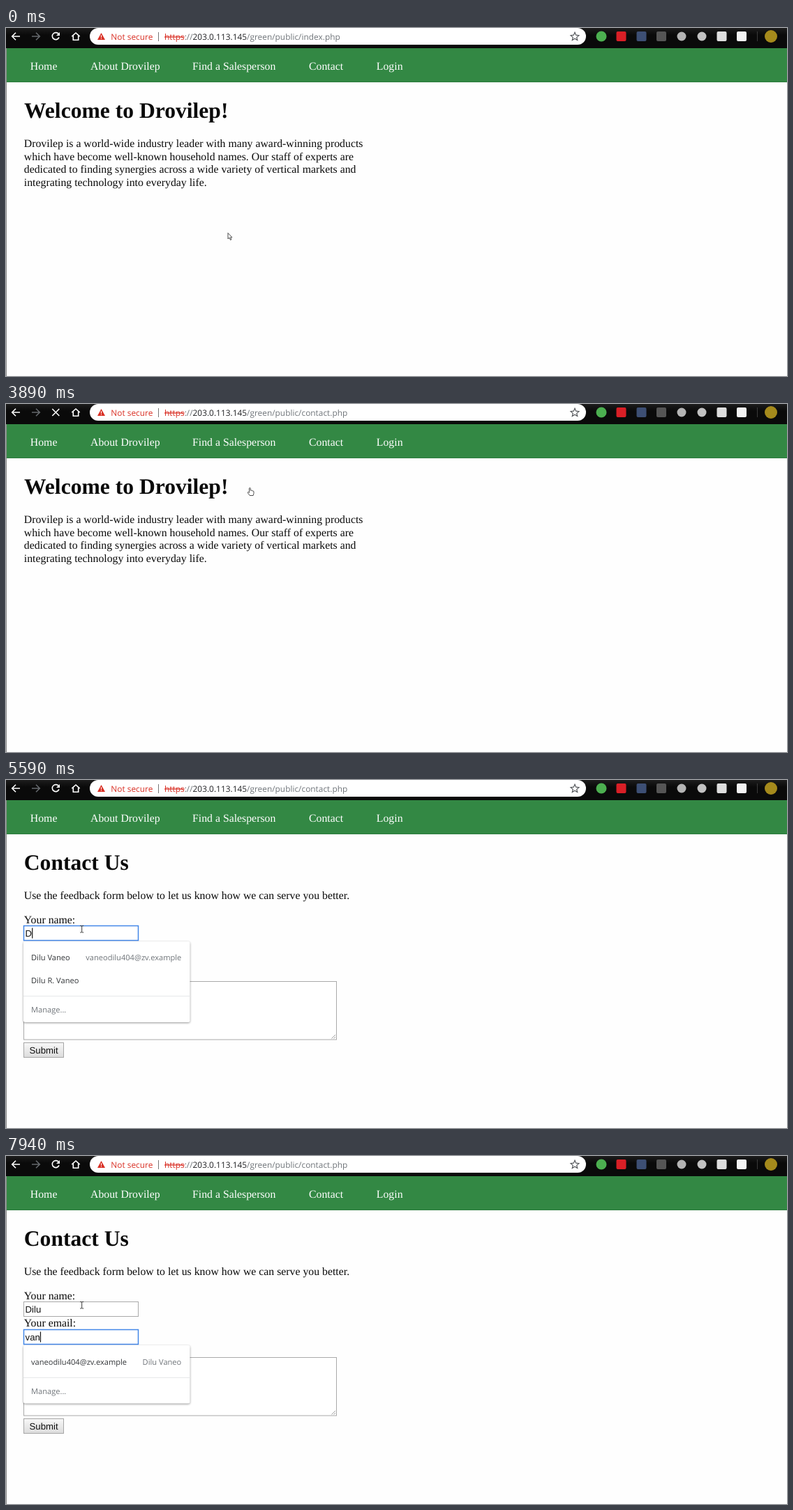
Write an HTML page that moves like this. It is 1119 px wide and 500 px high and loops after 8 s.

```html
<!DOCTYPE html>
<html lang="en">
<head>
<meta charset="utf-8">
<title>Feedback form</title>
<style>
  html, body { margin: 0; width: 100%; height: 100%; overflow: hidden; background: #fefefe; }
  svg { display: block; width: 1119px; height: 500px; }
  text { text-rendering: geometricPrecision; white-space: pre; }
  .serif { font: 15.8px "Liberation Serif", "Times New Roman", serif; fill: #0a0a0a; }
  .nav { fill: #fff; }
  .head { font-size: 31.6px; font-weight: bold; }
  .ui { font: 11.9px "Open Sans", "Noto Sans", sans-serif; fill: #70757a; }
  .item { font-size: 11.1px; fill: #333639; }
  .dim { fill: #70757a; }
  .field { font: 13.2px "Liberation Sans", Arial, sans-serif; fill: #111; }
  .box { fill: #fff; stroke: #a9a9a9; }
  .icon { fill: none; stroke: #fff; stroke-width: 1.6; }
  .menu rect { fill: #fff; filter: drop-shadow(0 1px 1.5px rgba(0, 0, 0, .42)); }
  .menu line { stroke: #e6e8ea; }
</style>
</head>
<body>
<svg id="stage" viewBox="0 0 1119 500"></svg>
<script>
const LOOP = 8000;
const BRAND = 'Drovilep', FIRST = 'Dilu', LAST = 'Vaneo';
const FULL = `${FIRST} ${LAST}`, MAIL = 'vaneodilu404@zv.example';

const text = (x, y, cls, body, extra = '') =>
  `<text x="${x}" y="${y}" class="${cls}" ${extra}>${body}</text>`;
const rect = (x, y, w, h, extra = '') =>
  `<rect x="${x}" y="${y}" width="${w}" height="${h}" ${extra}/>`;
const path = (d, extra = '') => `<path d="${d}" ${extra}/>`;
const dot = (x, r, fill) => `<circle cx="${x}" cy="12" r="${r}" fill="${fill}"/>`;
const tile = (x, fill) => rect(x - 7, 5, 14, 14, `rx="2" fill="${fill}"`);
const group = (id, body, extra = '') => `<g id="${id}" ${extra}>${body}</g>`;

const toolbar = `
  <linearGradient id="dark" x2="0" y2="1">
    <stop stop-color="#1d1d1d"/><stop offset=".35" stop-color="#0a0a0a"/><stop offset="1" stop-color="#0a0a0a"/>
  </linearGradient>
  ${rect(0, 0, 1119, 29, 'fill="url(#dark)"')}
  ${path('M20 12H9M14 6.7L8.7 12L14 17.3', 'class="icon"')}
  ${path('M37 12H48M43 6.7L48.3 12L43 17.3', 'class="icon" style="stroke:#66696d"')}
  ${group('reload', path('M75.6 9A5 5 0 1 0 76 13.4', 'class="icon"') + path('M77 6V11H72Z', 'fill="#fff"'))}
  ${path('M66.3 7L76.3 17M76.3 7L66.3 17', 'id="stop" class="icon"')}
  ${path('M94.3 12.2L100 7L105.7 12.2M96.3 11V17.3H103.7V11', 'class="icon"')}
  ${rect(120, 0, 711, 24, 'rx="12" fill="#fff"')}
  ${path('M136.5 7L142 17H131Z', 'fill="#d93025"')}
  ${path('M136.5 10.3V13.4M136.5 14.5V15.8', 'stroke="#fff" stroke-width="1.1"')}
  ${text(150.3, 17, 'ui', 'Not secure', 'style="fill:#d93025"')}
  ${path('M218.5 6V19', 'stroke="#777"')}
  ${text(227, 17, 'ui', '<tspan fill="#d93025" text-decoration="line-through">https</tspan>://' +
    '<tspan fill="#202124">203.0.113.145</tspan>/green/public/<tspan id="file"></tspan>.php')}
  ${path('M815 6.3L816.7 10.2L820.9 10.6L817.7 13.4L818.7 17.5L815 15.3L811.3 17.5L812.3 13.4L809.1 10.6L813.3 10.2Z',
    'fill="none" stroke="#55585c" stroke-width="1.2"')}
  ${dot(853, 7.5, '#4caf50')}${tile(881.5, '#d91f26')}${tile(910.5, '#3d4f74')}${tile(939, '#555')}
  ${dot(968, 6.5, '#b4b4b4')}${dot(997, 6.5, '#c2c2c2')}${tile(1025.5, '#dedede')}${tile(1054, '#f4f4f4')}
  ${path('M1076.5 5V19', 'stroke="#3a3a3a"')}
  ${dot(1096, 9, '#a58a1c')}`;

const nav = rect(0, 29, 1119, 49, 'fill="#338844"') + path('M0 77.5H1119', 'stroke="#2c7c3e"') +
  [[34.8, 'Home'], [121, `About ${BRAND}`], [267, 'Find a Salesperson'], [434, 'Contact'], [530.8, 'Login']]
    .map(([x, s]) => text(x, 60, 'serif nav', s)).join('');

const home = text(26, 129, 'serif head', `Welcome to ${BRAND}!`) + [
  `${BRAND} is a world-wide industry leader with many award-winning products`,
  'which have become well-known household names. Our staff of experts are',
  'dedicated to finding synergies across a wide variety of vertical markets and',
  'integrating technology into everyday life.'
].map((s, i) => text(25.8, 171 + 18.6 * i, 'serif', s)).join('');

const input = (id, y) => rect(25.5, y, 164, 21, `id="${id}Box" class="box"`) +
  text(27.6, y + 15, 'field', '', `id="${id}Text"`);

const contact = `
  <linearGradient id="face" x2="0" y2="1"><stop stop-color="#f8f8f8"/><stop offset="1" stop-color="#dcdcdc"/></linearGradient>
  ${text(25.8, 129, 'serif head', 'Contact Us')}
  ${text(25.8, 171, 'serif', 'Use the feedback form below to let us know how we can serve you better.')}
  ${text(25.8, 206, 'serif', 'Your name:')}${input('name', 209.5)}
  ${text(25.8, 245.3, 'serif', 'Your email:')}${input('mail', 249.5)}
  ${text(25.8, 285.3, 'serif', 'Feedback:')}
  ${rect(25.5, 289.5, 448, 83.5, 'class="box"')}
  ${path('M466.5 371.5L472 366M469.5 371.5L472 369', 'stroke="#888" stroke-width=".8"')}
  ${rect(25.5, 377.5, 57, 21, 'fill="url(#face)" stroke="#a6a6a6"')}
  ${text(33.5, 392.5, 'field', 'Submit')}
  ${path('M0 0V15', 'id="caret" stroke="#111" stroke-width="1.2"')}`;

const menu = (id, y, w, h, body) =>
  group(id, rect(25, y, w, h, 'rx="2.5"') + body, 'class="menu"');
const item = (y, s, side = '') => text(36, y, 'ui item', s) +
  (side && text(251.3, y, 'ui item dim', side, 'text-anchor="end"'));
const manage = y => `<line x1="25" x2="263.5" y1="${y}" y2="${y}"/>` + text(36, y + 23.2, 'ui item dim', 'Manage...');

const menus =
  menu('recent', 232, 165.5, 110.5, item(259.3, FIRST) + item(291.7, FULL) + item(324.1, 'drilo')) +
  menu('people', 232, 238.5, 116, item(259.3, FULL, MAIL) + item(291.7, `${FIRST} R. ${LAST}`) + manage(310.5)) +
  menu('mails', 272, 238.5, 83.5, item(299.6, MAIL, FULL) + manage(318.5));

const pointers =
  group('arrow', path('M.5 .5V9L2.5 7.3L4 10.6L5.4 10L4 6.9H6.5Z', 'fill="#fff" stroke="#222" stroke-width=".8"')) +
  group('hand', path('M3 7V1.4Q3.9 .2 4.8 1.4V4.7Q6 4 6.6 5Q7.7 4.5 8.2 5.5Q9.4 5.2 9.5 6.6V9L8.6 12H3.8L.9 8.2Q.7 6.7 2 7L3 8Z',
    'fill="#fff" stroke="#222" stroke-width=".8"')) +
  group('beam', path('M.5 .5H2.3L3 1L3.7 .5H5.5M3 1V9.5M.5 10H2.3L3 9.5L3.7 10H5.5', 'fill="none" stroke="#222" stroke-width=".9"'));

const $ = id => document.getElementById(id);
$('stage').innerHTML = rect(0, 0, 1119, 500, 'fill="#fefefe"') + toolbar + nav +
  group('home', home) + group('contact', contact) + menus +
  path('M.5 29V500', 'stroke="#8c8c8c"') + pointers;

// Each row: start time, then the values held from there on.
const POINTER = [
  [0, 'arrow', 317.5, 294], [130, 'beam', 363, 162], [280, 'arrow', 397, 126], [400, 'arrow', 424, 100],
  [520, 'arrow', 442, 83], [640, 'hand', 449, 63.5], [790, 'hand', 453, 57], [910, 'hand', 455, 53],
  [3610, 'hand', 423, 80], [3740, 'hand', 386, 102], [3890, 'hand', 345.5, 119.5], [4050, 'arrow', 385, 97.5],
  [4200, 'arrow', 411, 88.5], [4340, 'arrow', 352, 116], [4460, 'arrow', 232, 162],
  [4590, 'beam', 109, 205], [4730, 'beam', 105.7, 209]
];
const LOADING = [[0, false], [1470, true], [4050, false]];
const FILE = [[0, 'index'], [2800, 'contact']];
const PAGE = [[0, 'home'], [4050, 'contact']];
const FOCUS = [[0, ''], [5050, 'name'], [6990, 'mail']];
const MENU = [[0, ''], [5050, 'recent'], [5590, 'people'], [6990, ''], [7790, 'mails']];
const NAME = [[0, 0], [5470, 1], [5980, 2], [6120, 3], [6240, 4]];
const TYPED = [[0, 0], [7670, 1], [7790, 2], [7940, 3]];
const CARET = [[0, false], [5050, true], [6830, false], [6990, true], [7420, false], [7670, true]];

const at = (rows, t) => rows.findLast(row => row[0] <= t).slice(1);
const show = (id, on) => { $(id).style.display = on ? '' : 'none'; };
const write = (id, s) => { if ($(id).textContent !== s) $(id).textContent = s; };

function draw(t) {
  const [kind, x, y] = at(POINTER, t);
  for (const id of ['arrow', 'hand', 'beam']) show(id, id === kind);
  $(kind).setAttribute('transform', `translate(${x} ${y})`);

  const [loading] = at(LOADING, t), [page] = at(PAGE, t), [open] = at(MENU, t);
  show('reload', !loading);
  show('stop', loading);
  show('home', page === 'home');
  show('contact', page === 'contact');
  for (const id of ['recent', 'people', 'mails']) show(id, id === open);

  write('file', at(FILE, t)[0]);
  write('nameText', FIRST.slice(0, at(NAME, t)[0]));
  write('mailText', MAIL.slice(0, at(TYPED, t)[0]));

  const [focus] = at(FOCUS, t);
  for (const id of ['name', 'mail']) {
    $(id + 'Box').style.cssText = id === focus ? 'stroke:#4387e8;stroke-width:1.5' : '';
  }
  show('caret', at(CARET, t)[0]);
  if (focus) {
    const end = 28.2 + $(focus + 'Text').getComputedTextLength();
    $('caret').setAttribute('transform', `translate(${end} ${focus === 'name' ? 212.5 : 252.5})`);
  }
}

const start = performance.now();
function tick() {
  draw((performance.now() - start) % LOOP);
  requestAnimationFrame(tick);
}
tick();
</script>
</body>
</html>
```
